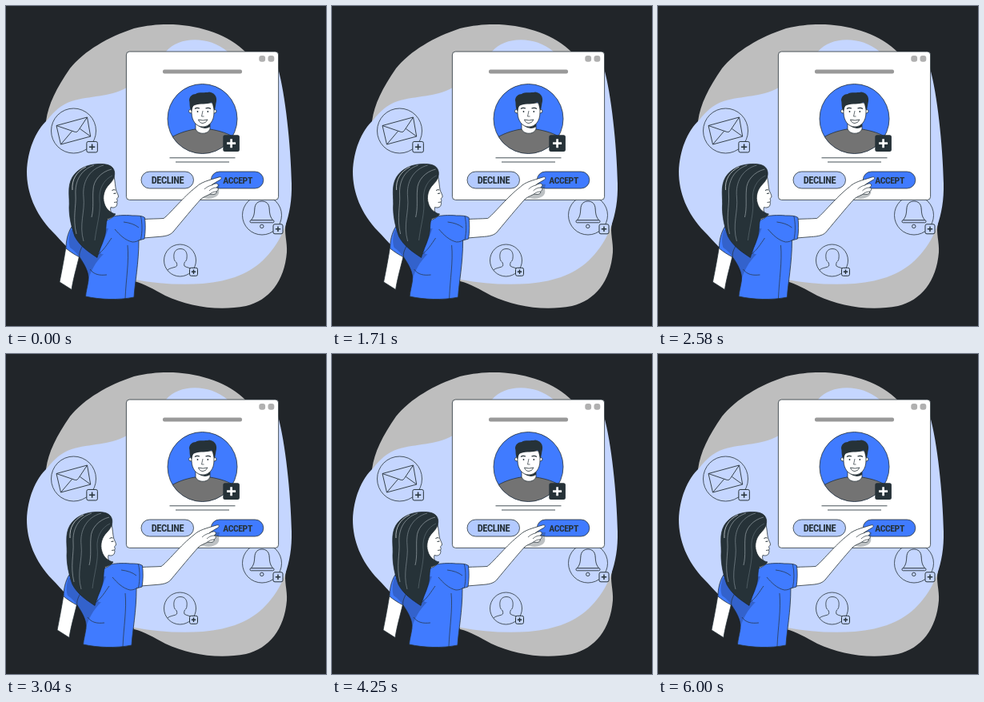
An HTML page with a canvas for the animation above (6.04 s loop, 400 px wide and 400 px high).

```html
<!DOCTYPE html>
<html lang="en">
<head>
<meta charset="utf-8">
<title>Friend request</title>
<style>
  html, body { margin: 0; width: 100%; height: 100%; overflow: hidden; background: #212529; }
  canvas { display: block; width: 400px; height: 400px; }
</style>
</head>
<body>
<canvas id="stage"></canvas>
<script>
const INK = '#263238', BLUE = '#407bff', PALE = '#c5d6ff', WHITE = '#fff';
const LOOP = 6040;
const canvas = document.getElementById('stage');
const ctx = canvas.getContext('2d');
const ratio = window.devicePixelRatio || 1;
canvas.width = canvas.height = 400 * ratio;

function paint(path, fill, stroke, width = 0.8) {
  if (fill) { ctx.fillStyle = fill; ctx.fill(path); }
  if (stroke) { ctx.strokeStyle = stroke; ctx.lineWidth = width; ctx.stroke(path); }
}
const shape = (d, fill, stroke, width) => paint(new Path2D(d), fill, stroke, width);
const line = (d, color = INK, width = 0.7) => shape(d, null, color, width);

function circle(x, y, r, fill, stroke, width) {
  const p = new Path2D();
  p.arc(x, y, r, 0, Math.PI * 2);
  paint(p, fill, stroke, width);
}

function box(x, y, w, h, r, fill, stroke, width) {
  const p = new Path2D();
  p.roundRect(x, y, w, h, r);
  paint(p, fill, stroke, width);
}

function plus(x, y, arm, color, width) {
  line(`M${x - arm} ${y}H${x + arm}M${x} ${y - arm}V${y + arm}`, color, width);
}

function badge(x, y, size) {
  box(x - size / 2, y - size / 2, size, size, 2, PALE, INK, 1);
  plus(x, y, size * 0.27, INK, 1.5);
}

const NARROW = '"Roboto Condensed", "Open Sans Condensed", "Liberation Sans Narrow", ' +
  '"Noto Sans CJK SC", "Noto Sans CJK JP", sans-serif';

function label(text, x, y, maxWidth) {
  ctx.fillStyle = INK;
  ctx.textAlign = 'center';
  ctx.letterSpacing = '-0.4px';
  let size = 15.5;
  do {
    size -= 0.25;
    ctx.font = `condensed 700 ${size}px ${NARROW}`;
  } while (size > 8 && ctx.measureText(text).width > maxWidth);
  ctx.fillText(text, x, y + size * 0.36);
}

function backdrop() {
  ctx.fillStyle = '#212529';
  ctx.fillRect(0, 0, 400, 400);
  shape('M50 144C53 122 63 103 80 78C98 56 127 39 160 28C178 23.5 194 22.5 209 23' +
        'C245 25 278 36 300 58C340 130 330 230 350 272C347 282 352 296 351 308' +
        'C348 344 329 368 300 375C263 382 228 375 199 362C184 354 173 347 160 344L120 250Z', '#bebebe');
  shape('M26 207C27 181 36 157 52 142C60 132 69 123 82 119C105 112 129 114 150 102.5' +
        'C174 88 183 70 200 57C216 38 253 37 277 57C310 60 330 58 340 78' +
        'C349 110 356 173 357 222C358 262 345 294 324 315C306 334 280 344 246 347' +
        'C216 349 188 347 161 342C140 338 110 330 76 301C69 294 64 288 58 282' +
        'C36 259 26 233 26 207Z', PALE);
}

function icons() {
  circle(84.5, 156, 28, null, INK);
  shape('M63 149.5L101.5 139L105.7 163L68.5 173Z', PALE, INK, 0.9);
  line('M63 149.5L86.5 157.5Q89 158 90.5 155.5L101.5 139M68.5 173L82.5 156.5M105.7 163L92.5 153.5', INK, 0.9);
  badge(107.6, 176.2, 13.5);

  circle(320, 261.5, 24.5, null, INK);
  shape('M306 268C310 264 310.5 259 310.8 254C311 247 315 244 320 244C325 244 329 247 329.2 254' +
        'C329.5 259 330 264 334 268Z', PALE, INK, 0.9);
  box(305, 267.8, 30, 3, 1.4, PALE, INK, 0.9);
  circle(319.8, 275.4, 2.2, PALE, INK, 0.9);
  badge(340, 278.8, 12);

  circle(217.5, 318, 20, null, INK);
  line('M202 330C205 327 212 327 213.5 325C214 323 213.5 321 212.5 320C211 319 210 317 210 315' +
       'C209 308 212 303.5 218 303.5C224 303.5 227 308 226 315C226 317 225 319 223.5 320' +
       'C222.5 322 222.5 324 223 325C225 327 231 327 234 330', INK, 0.8);
  badge(234.5, 332.3, 10);
}

function avatar() {
  circle(245.5, 141, 43.5, BLUE);
  ctx.save();
  const clip = new Path2D();
  clip.arc(245.5, 141, 43.5, 0, Math.PI * 2);
  ctx.clip(clip);
  shape('M204 166C213 160 224 156 236 154H255C267 156 278 159 288 166V190H204Z', '#737373', INK);
  shape('M237 143V154C240 161 252 161 255 154V143Z', WHITE, INK);
  shape('M238 148Q247 155 255 147V151Q247 156 238 148Z', INK);
  ctx.restore();
  circle(231, 131.5, 2.4, WHITE, INK);
  circle(260.5, 131.5, 2.4, WHITE, INK);
  shape('M232 121H260V133C260 144 254 151 246 151C238 151 232.5 144 232 134Z', WHITE, INK);
  shape('M231 130C229 126 230 121 229 118C229 113 233 110 237 110C241 107 249 109 254 107.5' +
        'C260 108 264 113 263 119C262 123 262 127 260.5 131C259 128 259 124 257 120' +
        'C251 124 243 121 236 124C233 125 233 128 232 132Z', INK);
  line('M236 128.5Q238.5 126.5 242 128M249.5 128Q253 126.5 256 128.5', INK, 1.1);
  circle(239.5, 132, 0.9, INK);
  circle(252.3, 132, 0.9, INK);
  line('M246 131L244.5 138H247.5');
  shape('M240.5 142Q246 144 252 142Q250 146.5 246 146.5Q242 146.5 240.5 142Z', WHITE, INK, 0.8);
  circle(245.5, 141, 43.5, null, INK);
  box(271.3, 161.3, 20.6, 20.8, 2.5, INK);
  plus(281.6, 171.7, 5.5, WHITE, 2.7);
}

function panel() {
  box(150.4, 57, 190.2, 185.4, 4, WHITE, INK, 0.8);
  box(316.3, 62, 7.8, 7.8, 3, '#b0b0b0');
  box(327.5, 62, 7.8, 7.8, 3, '#b0b0b0');
  box(196, 79.5, 99, 5, 2, '#999');
  avatar();
  line('M204.5 189.8H286.5M212 195H279', '#455056', 1);
  box(169, 207, 65.5, 21, 10.5, '#b3caff', INK);
  box(256.3, 207, 65.5, 21, 10.5, BLUE, INK);
  label('DECLINE', 202, 217.5, 41);
  label('ACCEPT', 289.5, 217.5, 37);
  shape('M243 239C249 241 256 242 261 239C266 237 267 233 266 229L267 223L251 222Z', 'rgba(38,50,56,.3)');
}

function arms() {
  shape('M75 301C73 314 70 330 67 345L82 354.5C84 341 88 328 92 311Z', WHITE, INK);
  shape('M172 266.5C181 266 189 266 197 265.5C204 261 221 239 238 226C244 220 253 218 266 214' +
        'C269 213 270.5 215 268 217C263 220 259 222 257 224C260 222 264 221 265 223' +
        'C266 225 264 226 263 227C266 227 266 230 263 232C264 235 260 236 255 235' +
        'C252 237 248 238 244 241C234 252 220 269 210 281C206 287 198 288 190 288.5L172 290Z', WHITE, INK);
  line('M257 224C253 225 250 227 248 229M263 227C259 227 256 229 254 231M263 232C260 232 257 233 255 235');
}

function shirt() {
  shape('M82 276C77 284 75 294 75 303C80 307 86 311 92 314C98 323 104 333 103 343' +
        'C102 350 100 357 99.5 363C117 367 140 368 160 364C161 346 166 322 166 293' +
        'L173 291C174.5 282 174.5 273 173.5 264.5C170 262 164 262 158 262C148 261 138 262 133 263' +
        'C123 265 116 267 108 268Z', BLUE, INK);
  shape('M81 280C78 289 78 296 80 302C91 309 100 325 103 342C106 331 112 320 122 310' +
        'C117 311 116 306 121 297L128 278Z', 'rgba(0,0,0,.2)');
  line('M168.5 263C170.5 272 170.5 282 168.5 292M136 279C142 286 149 293 158 295C162 295 165 294 167 292');
  line('M152 299C154 320 150 341 149 366M105 329C110 336 117 337 126 336M96 299C93 305 91 309 92 314');
  line('M147 270C155 271 161 273 166 277M132 290C127 297 122 306 114 311');
}

function head() {
  shape('M118 213H135C136.5 220 136.5 225 137.5 230C138.5 233 140.5 236 140.5 238C140.5 240 138.5 240 138.5 241' +
        'C139.5 243 139.5 244 138.5 245C139.5 247 138.5 248 138.5 249C137.5 252 134 252.5 131 251.5' +
        'C130 255 131 259 135 262.5C129 268 121 270 113 268Z', WHITE, INK);
  line('M132.5 230.5Q135 229 136.5 230', INK, 1);
  line('M134.5 234.5L137.5 234', INK, 1.2);
  line('M135 245.5L138.5 245', INK, 0.8);
  shape('M135.5 207C134 199 126 197 115 197.5C101 198 89 204 83 214C76 226 80 239 79 252' +
        'C79 264 82 277 86 288C92 300 104 308 114 314.5C116 306 120 299 123 289' +
        'C126 280 124 271 127 266C131 265 135 263 137 260C131 259 125 254 123 247' +
        'C120 238 123 229 129 223C134 218 136.5 213 135.5 207Z', INK, '#1b2529', 0.7);
  line('M132 204C119 207 109 218 109 230C108 240 110 252 107 264', '#aeb8bd', 0.6);
  line('M122 199C104 204 95 220 97 239C99 257 91 273 97 294', '#8f9ba1', 0.6);
  line('M110 199C93 205 86 219 87 236C88 250 83 265 88 285', '#aeb8bd', 0.6);
  line('M133 212C122 217 116 229 117 242C119 257 113 275 111 293', '#66747b', 0.6);
  line('M100 201C88 207 82 217 83 230', '#e5eaec', 0.7);
}

// Sideways shake, a value for every tenth of the loop.
const SHAKE = [0, -1, 2, -4, 4, -4, 4, -4, 2, -1, 0];
function sway(ms) {
  const p = (ms % LOOP) / LOOP * 10;
  const i = Math.floor(p);
  return 0.8 * (SHAKE[i] + (SHAKE[i + 1] - SHAKE[i]) * (p - i));
}

function draw(ms) {
  ctx.setTransform(ratio, 0, 0, ratio, 0, 0);
  ctx.lineJoin = 'round';
  backdrop();
  icons();
  panel();
  ctx.translate(sway(ms), 0);
  arms();
  shirt();
  head();
}

const start = performance.now();
function tick() {
  draw(performance.now() - start);
  requestAnimationFrame(tick);
}
tick();
</script>
</body>
</html>
```
